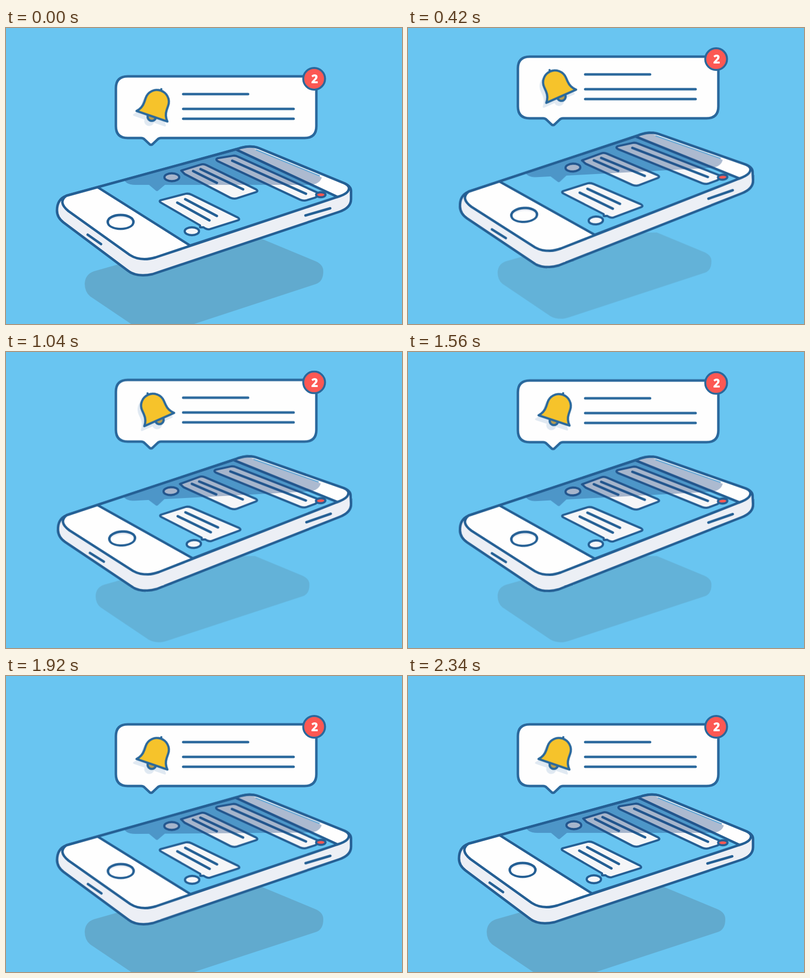
Animation of 800x600 px, one loop 2360 ms. Source, as an HTML page:

```html
<!DOCTYPE html>
<html lang="en">
<head>
<meta charset="utf-8">
<title>Phone notification</title>
<style>
  :root {
    --snap: cubic-bezier(.4, 0, .3, 1);
    --quick: cubic-bezier(.3, 0, .1, 1);
    --soft: cubic-bezier(.35, 0, .5, 1);
    --heavy: cubic-bezier(.45, 0, .6, 1);
  }
  html, body { margin: 0; width: 100%; height: 100%; overflow: hidden; background: #69c5f1; }
  svg { display: block; width: 100vw; height: 100vh; }

  .ink { stroke: #245f94; stroke-width: 5; stroke-linecap: round; stroke-linejoin: round; fill: none; }
  .thin { stroke-width: 4.3; }
  .bubble { stroke: #2a689c; }
  .white { fill: #fefefe; }
  .paper { fill: #f5f6f8; }
  .side { fill: #eceff5; }
  .screen { fill: #69c5f1; }
  .red { fill: #fc5853; }
  .cast { fill: rgba(32, 70, 127, .367); }
  .ground { fill: #4b555a; }
  .count { font: 800 24px "Open Sans", "Noto Sans", sans-serif; fill: #fff; text-anchor: middle; }

  .lift, .rise, .tilt, .swing, .ground { animation: 2360ms linear infinite; }
  .lift { animation-name: lift; }
  .rise { animation-name: rise; }
  .tilt { animation-name: tilt; transform-origin: 400px 338px; }
  .swing { animation-name: swing; }
  .ground { animation-name: ground; }

  @keyframes lift {
    0% { transform: translateY(0); animation-timing-function: var(--quick); }
    16.5% { transform: translateY(-39.5px); animation-timing-function: ease-out; }
    29.7% { transform: translateY(-42.3px); }
    44.1% { transform: translateY(-41.4px); }
    66.1% { transform: translateY(-40.3px); animation-timing-function: var(--soft); }
    80.5%, 100% { transform: translateY(0); }
  }
  @keyframes rise {
    0% { transform: translateY(0); animation-timing-function: var(--heavy); }
    23.7%, 44.1% { transform: translateY(-24px); }
    66.1% { transform: translateY(-23.3px); animation-timing-function: var(--soft); }
    81.4% { transform: translateY(1px); animation-timing-function: ease-in-out; }
    93.2%, 100% { transform: translateY(0); }
  }
  @keyframes tilt {
    0% { transform: rotate(0deg); animation-timing-function: var(--snap); }
    19%, 71.2% { transform: rotate(-3.05deg); animation-timing-function: var(--snap); }
    89.4%, 100% { transform: rotate(0deg); }
  }
  @keyframes swing {
    0% { transform: rotate(19deg); animation-timing-function: var(--snap); }
    19%, 50% { transform: rotate(-24deg); animation-timing-function: var(--snap); }
    69%, 100% { transform: rotate(19deg); }
  }
  @keyframes ground {
    0% { transform: none; fill-opacity: .23; animation-timing-function: var(--snap); }
    19% { transform: matrix(.896, 0, 0, .896, 38.6, 31); fill-opacity: .165; }
    44.1%, 66.1% { transform: matrix(.896, 0, 0, .896, 38.6, 30); fill-opacity: .165; animation-timing-function: var(--soft); }
    80.5%, 100% { transform: none; fill-opacity: .23; }
  }
</style>
</head>
<body>
<svg viewBox="0 0 800 600">
  <defs>
    <path id="face" d="M122 340L468 245Q493 236 512 244L684 315Q698 322 690 332Q685 338 668 343L302 465Q272 474 250 460L126 371Q104 353 122 340Z"/>
    <path id="bell" d="M-33 20Q-24 11 -24 -2V-11A24 24 0 0 1 24 -11V-2Q24 11 33 20Z"/>
    <clipPath id="glass"><use href="#face"/></clipPath>
  </defs>

  <path class="ground" d="M518 428L626 473Q641 480 641 493Q641 514 626 519L322 619Q297 628 278 617L170 544Q159 535 159 518Q160 499 178 493L400 430Z"/>

  <g class="rise"><g class="tilt">
    <path class="ink side" d="M122 340Q103 347 103 370Q103 384 116 394L245 491Q263 506 296 499L672 373Q697 365 697 347V330Q697 321 684 315L512 244Q493 236 468 245Z"/>
    <use href="#face" class="white"/>
    <g clip-path="url(#glass)">
      <path class="ink screen" d="M184 322L464 246L671 343L372 441Z"/>
      <g class="ink thin">
        <path class="paper" d="M428 264L458 259Q464 258 469 261L630 334Q634 340 624 344L608 349Q601 351 594 348L428 270Q422 266 428 264Z"/>
        <path class="paper" d="M354 289L393 277Q399 275 405 278L505 327Q511 331 504 333L467 345Q460 347 453 344L361 296Z"/>
        <path class="paper" d="M313 349L363 336Q369 335 375 338L468 384Q474 388 468 390L411 408Q406 409 399 404H392V400L313 354Q308 351 313 349Z"/>
        <ellipse class="paper" cx="335" cy="302.500" rx="15" ry="8"/>
        <ellipse class="paper" cx="375.500" cy="412" rx="14.500" ry="8"/>
      </g>
      <path class="ink" d="M457 269L606 336M393 286L479 327M378 290L426 314M362 347L426 381M346 354L411 390"/>
      <path class="cast" d="M236 300Q238 318 262 318H289L302 329Q305 332 308 329L321 318H616Q634 316 638 303L505 246L470 230L400 200Z"/>
      <path d="M505 247L634 300" fill="none" stroke="#69a9d6" stroke-width="2.500"/>
    </g>
    <ellipse class="ink thin red" cx="636" cy="338" rx="9.500" ry="5"/>
    <ellipse class="ink side" cx="231.500" cy="393" rx="26" ry="14"/>
    <ellipse class="white" cx="231.500" cy="395" rx="23" ry="10"/>
    <use href="#face" class="ink"/>
    <path class="ink" d="M165 419L192 438M605 380L655 365.500"/>
  </g></g>

  <g class="lift">
    <path class="ink bubble white" d="M246 98H603Q627 98 627 122V199Q627 223 603 223H313Q309 223 306 226L296 235.500Q293 238 290 235.500L280 226Q277 223 273 223H246Q222 223 222 199V122Q222 98 246 98Z"/>
    <path class="ink bubble" d="M358 134H489M358 164H581M358 184H581"/>
    <g transform="translate(296.400 168)" fill="#e0e9f2">
      <g class="swing"><circle cy="22" r="10"/><use href="#bell" stroke="#e0e9f2" stroke-width="4" stroke-linejoin="round"/></g>
    </g>
    <g transform="translate(301.400 160)">
      <g class="swing ink bubble" style="stroke-width:4.500px">
        <path d="M0 -35V-38"/>
        <circle cy="21" r="8.500" fill="#b99d50"/>
        <use href="#bell" fill="#f6c32b"/>
      </g>
    </g>
    <circle class="ink bubble red" cx="622.500" cy="103" r="22" style="stroke-width:4px"/>
    <text class="count" x="623.500" y="112">2</text>
  </g>
</svg>
</body>
</html>
```
